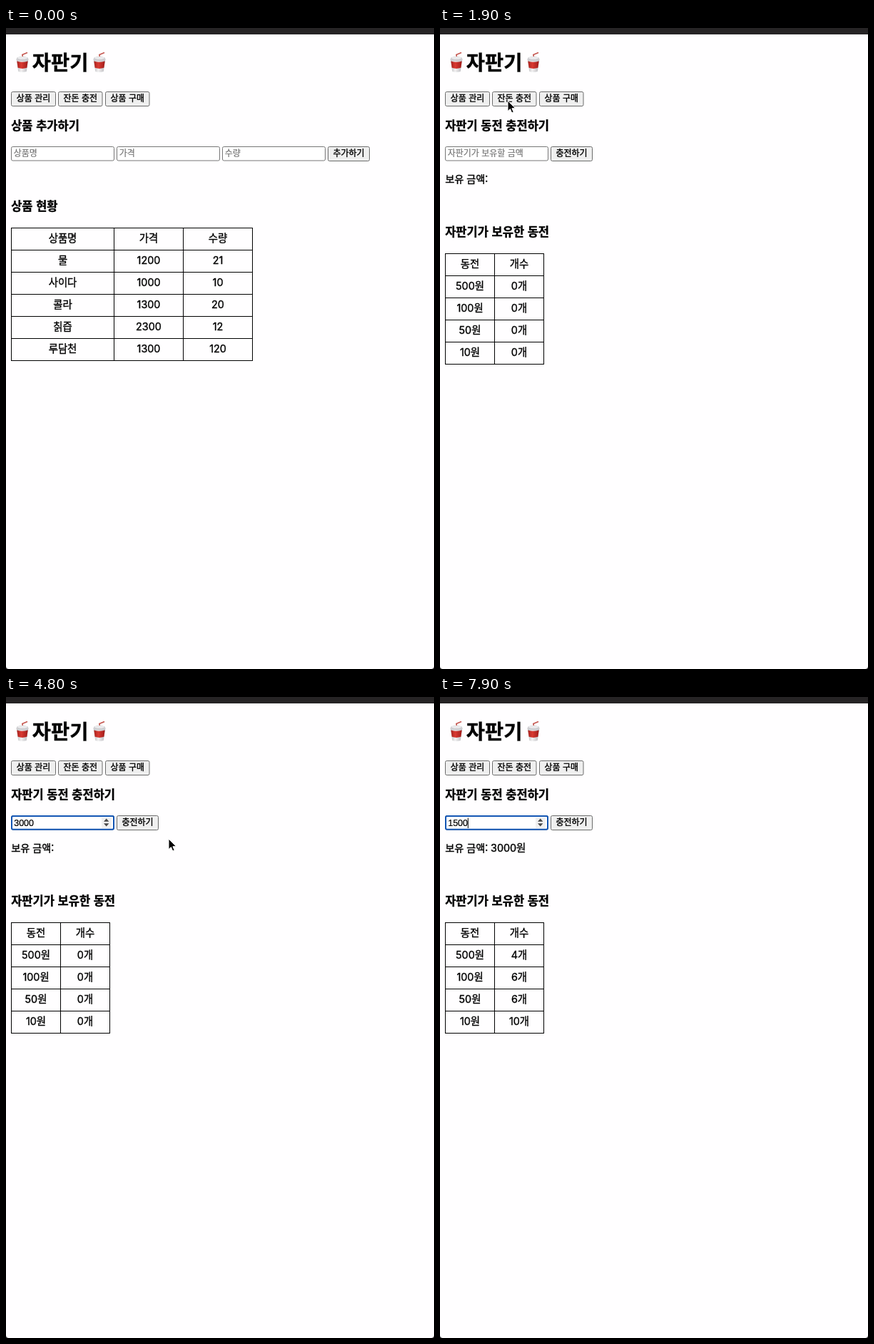
Write an HTML page that moves like this. It is 600 px wide and 899 px high and loops after 8000 ms.

```html
<!DOCTYPE html>
<html lang="ko">
<head>
<meta charset="utf-8">
<title>자판기</title>
<style>
  html, body { margin: 0; width: 100%; height: 100%; overflow: hidden; background: #262425; }
  svg { display: block; width: 600px; height: 899px; }
  text {
    font: 14.4px "Noto Sans CJK KR", "Noto Sans CJK", sans-serif;
    fill: #000; stroke: #000; stroke-width: .35px; white-space: pre;
  }
  .num { font-family: Inter, "Noto Sans CJK KR", "Noto Sans CJK", sans-serif; }
  .h1 { font-size: 28.5px; font-weight: 700; }
  .h3 { font-size: 16.5px; font-weight: 700; }
  .label { font-size: 14.2px; }
  .btn { font-size: 12px; }
  .hint { font-size: 12px; fill: #757575; stroke: #757575; stroke-width: .2px; }
  .value { font: 12.5px "Liberation Sans", Arial, sans-serif; stroke-width: .2px; }
  .mid { text-anchor: middle; }
  .button { fill: #efefef; stroke: #6b6b6b; }
  .button.down { fill: #f6f6f6; stroke: #a2a2a2; }
  .input { fill: #fff; stroke: #767676; }
  .ring { fill: none; stroke: #1356b4; stroke-width: 2; }
  .grid { fill: none; stroke: #000; }
</style>
</head>
<body>
<svg viewBox="0 0 600 899">
  <defs>
    <linearGradient id="red">
      <stop offset="0" stop-color="#a8231f"/><stop offset=".4" stop-color="#d93a32"/><stop offset="1" stop-color="#a01c1a"/>
    </linearGradient>
    <linearGradient id="paper">
      <stop offset="0" stop-color="#bdbdc0"/><stop offset=".4" stop-color="#f2f2f3"/><stop offset="1" stop-color="#b8b8bc"/>
    </linearGradient>
    <g id="cup">
      <path d="M10.8 9 L9.8 4.4 L17 1.6" fill="none" stroke="#c4564f" stroke-width="1.6" stroke-linejoin="round"/>
      <path d="M1.8 10 H18.2 L15.8 28 Q10 30 4.2 28 Z" fill="url(#paper)"/>
      <path d="M2.3 13.5 Q10 16 17.7 13.5 L16.4 22.8 Q10 25 3.6 22.8 Z" fill="url(#red)"/>
      <path d="M2.4 8.4 Q10 5.8 17.6 8.4 L18.8 12 Q10 15.4 1.2 12 Z" fill="#cfcfd2"/>
      <ellipse cx="10" cy="9" rx="6.8" ry="1.7" fill="#ececee"/>
    </g>
    <path id="stem" d="M-3 -7.5 Q0 -7.5 0 -5.5 Q0 -7.5 3 -7.5 M0 -6 V6 M-3 7.5 Q0 7.5 0 5.5 Q0 7.5 3 7.5 M-1.8 2.5 H1.8"/>
  </defs>
  <path d="M0 9 H600 V895 Q600 899 596 899 H4 Q0 899 0 895 Z" fill="#fffeff"/>
  <use href="#cup" x="13" y="33"/>
  <use href="#cup" x="121" y="33"/>
  <g id="header"></g>
  <g id="goods"></g>
  <g id="coins"></g>
  <path id="arrow" d="M0 0 V14.6 L3.4 11.6 L5.7 17 L8.2 16 L5.9 10.7 H10.6 Z" fill="#000" stroke="#fff"/>
  <g id="beam" fill="none">
    <use href="#stem" stroke="#fff" stroke-width="2.4"/>
    <use href="#stem" stroke="#000"/>
  </g>
</svg>
<script>
const NS = 'http://www.w3.org/2000/svg';
const $ = id => document.getElementById(id);
const LOOP = 8000, STEP = 100;

function add(parent, tag, attrs, label) {
  const el = document.createElementNS(NS, tag);
  for (const k in attrs) el.setAttribute(k, attrs[k]);
  if (label !== undefined) el.textContent = label;
  return parent.appendChild(el);
}
const text = (p, x, y, cls, label) => add(p, 'text', { x, y, class: cls }, label);
const box = (p, x, y, w, h, cls) => add(p, 'rect', { x, y, width: w, height: h, rx: 2, class: cls });

function button(p, x, y, w, label) {
  const el = box(p, x, y, w, 20, 'button');
  text(p, x + w / 2, y + 13.9, 'btn mid', label);
  return el;
}
function input(p, x, label) {
  box(p, x, 166.5, 144, 19.5, 'input');
  return text(p, x + 3.2, 180.4, 'hint', label);
}
function table(p, xs, top, rows) {
  const left = xs[0], right = xs[xs.length - 1], bottom = top + 31 * rows.length;
  let d = '';
  for (const x of xs) d += `M${x} ${top}V${bottom}`;
  for (let i = 0; i <= rows.length; i++) d += `M${left - .5} ${top + 31 * i}H${right + .5}`;
  add(p, 'path', { d, class: 'grid' });
  return rows.map((row, r) => row.map((label, c) =>
    text(p, (xs[c] + xs[c + 1]) / 2, top + 31 * r + 19, 'num mid', label)));
}

const header = $('header'), goods = $('goods'), coins = $('coins');
text(header, 36.7, 58.5, 'h1', '자판기');
button(header, 7.5, 89.5, 62, '상품 관리');
const chargeTab = button(header, 73.5, 89.5, 61.5, '잔돈 충전');
button(header, 139.5, 89.5, 61.5, '상품 구매');

text(goods, 7.2, 143.4, 'h3', '상품 추가하기');
input(goods, 7.5, '상품명');
input(goods, 155.5, '가격');
input(goods, 303.5, '수량');
button(goods, 451.5, 166.5, 58, '추가하기');
text(goods, 7.2, 256.4, 'h3', '상품 현황');
table(goods, [7.5, 151.5, 248.5, 345.5], 280.5, [
  ['상품명', '가격', '수량'],
  ['물', '1200', '21'],
  ['사이다', '1000', '10'],
  ['콜라', '1300', '20'],
  ['칡즙', '2300', '12'],
  ['루담천', '1300', '120']
]);

text(coins, 7.2, 143.4, 'h3', '자판기 동전 충전하기');
const hint = input(coins, 7.5, '자판기가 보유할 금액');
const ring = box(coins, 8, 167, 143, 18.7, 'ring');
const typed = text(coins, 11.2, 180.5, 'value', '');
const spin = add(coins, 'g', {});
add(spin, 'rect', { x: 134, y: 169, width: 14, height: 15, fill: '#f0f0f0' });
add(spin, 'path', { d: 'M137 174.8 L140.7 170.6 L144.4 174.8Z M137 177.2 L140.7 181.4 L144.4 177.2Z', fill: '#484848' });
const caret = add(coins, 'rect', { y: 169.5, width: 1, height: 14.5 });
const charge = button(coins, 155.5, 166.5, 58, '충전하기');
text(coins, 7.2, 217.4, 'label', '보유 금액:');
const total = text(coins, 71, 217.4, 'num', '3000원');
text(coins, 7.2, 292.4, 'h3', '자판기가 보유한 동전');
const counts = table(coins, [7.5, 76.5, 145.5], 316.5, [
  ['동전', '개수'], ['500원', ''], ['100원', ''], ['50원', ''], ['10원', '']
]).slice(1).map(row => row[1]);

// pointer: [time, x, y, shape]; shapes: a = arrow, b = text beam, '' = hidden
const path = [
  [0, 640, 400, ''], [200, 535, 370, 'a'], [300, -8, 243, 'a'], [400, -8, 243, 'a'],
  [700, 52, 128, 'a'], [900, 124, 27, 'a'], [1100, 112, 66, 'a'], [1300, 95, 102, 'a'],
  [2300, 95, 102, 'a'], [2600, 98, 160, 'a'], [2700, 96, 169, 'b'], [3100, 93, 169, 'b'],
  [3600, 93, 169, ''], [4600, 110, 176, 'b'], [4700, 196, 188, 'a'], [4800, 228, 199, 'a'],
  [5300, 184, 178, 'a'], [6000, 184, 178, 'a'], [6100, 166, 181, 'a'], [6200, 118, 181, 'b'],
  [6300, 90, 180, 'b'], [7400, 90, 180, '']
];
// field contents: [time, value]
const keys = [
  [0, ''], [3600, '3'], [3800, '30'], [3900, '300'], [4100, '3000'],
  [5600, ''], [7400, '1'], [7500, '15'], [7800, '150'], [7900, '1500']
];
const digit = 12.5 * .556;

function last(list, t) {
  let i = 0;
  while (i + 1 < list.length && list[i + 1][0] <= t) i++;
  return i;
}
const show = (el, on) => el.setAttribute('visibility', on ? 'inherit' : 'hidden');

function pointer(t) {
  const i = last(path, t), a = path[i], b = path[i + 1] || a;
  const k = b === a || !a[3] || !b[3] ? 0 : (t - a[0]) / (b[0] - a[0]);
  const at = `translate(${a[1] + (b[1] - a[1]) * k} ${a[2] + (b[2] - a[2]) * k})`;
  for (const [id, shape] of [['arrow', 'a'], ['beam', 'b']]) {
    $(id).setAttribute('transform', at);
    show($(id), a[3] === shape);
  }
  return a[3];
}

function draw(t) {
  const shape = pointer(t);
  const charged = t >= 5600;
  show(goods, t < 1900);
  show(coins, t >= 1900);
  chargeTab.classList.toggle('down', t === 1800);
  charge.classList.toggle('down', t === 5500);

  const [since, value] = keys[last(keys, t)];
  const focus = t >= 2900 && t !== 5500;
  show(ring, focus);
  show(hint, t >= 1900 && !value);
  typed.textContent = value;
  show(spin, focus || (t >= 1900 && shape === 'b'));
  const start = Math.max(since, 2900);
  show(caret, focus && Math.floor((t - start) / 500) % 2 === 0);
  caret.setAttribute('x', 11 + digit * value.length);

  show(total, charged);
  counts.forEach((el, i) => el.textContent = (charged ? [4, 6, 6, 10][i] : 0) + '개');
}

const began = performance.now();
function tick() {
  const t = (performance.now() - began) % LOOP;
  draw(Math.floor(t / STEP) * STEP);
  requestAnimationFrame(tick);
}
tick();
</script>
</body>
</html>
```
